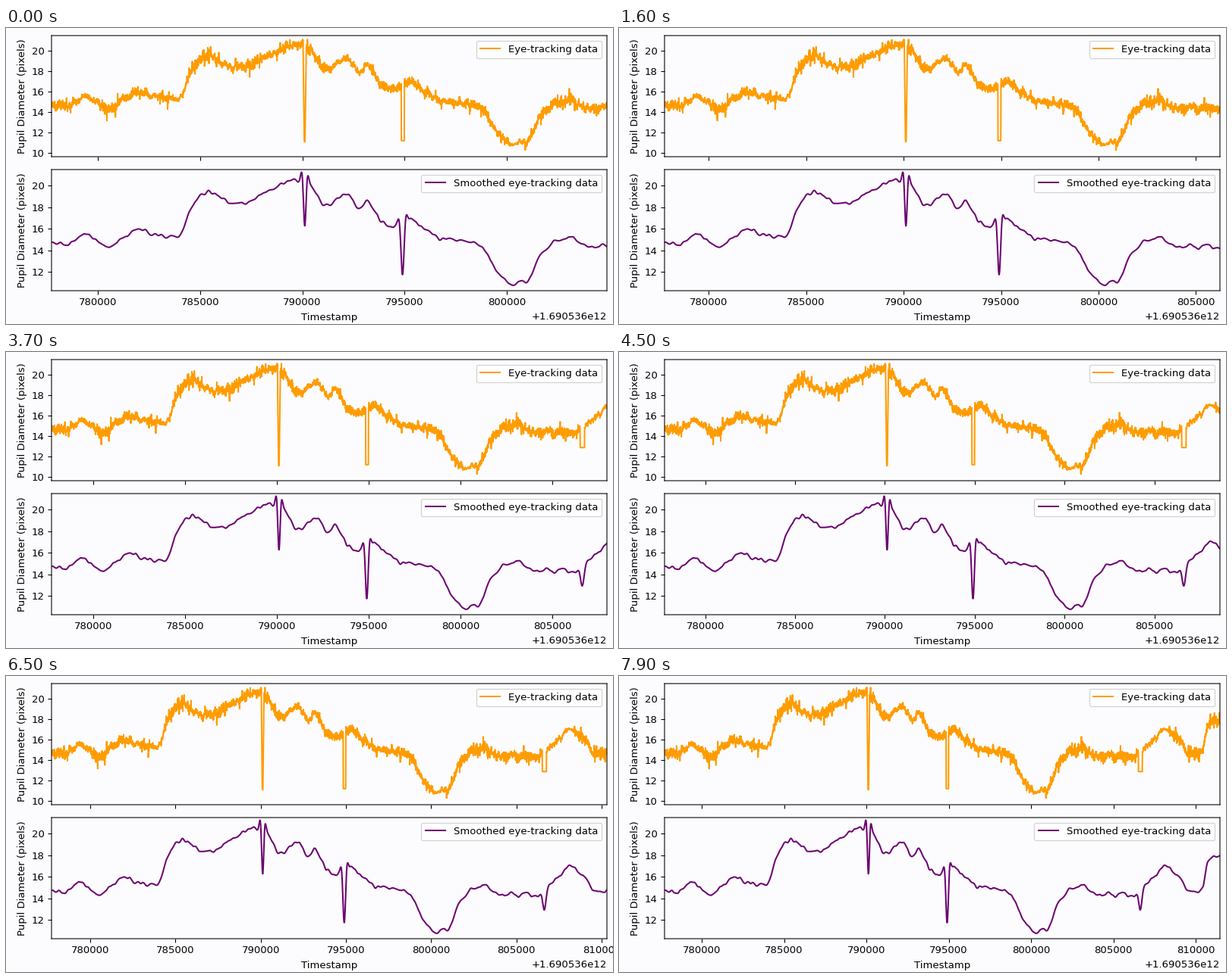
A matplotlib script for the animation above (8 s loop, 800 px wide and 391 px high).

```python
import numpy as np
import matplotlib.pyplot as plt
from matplotlib.animation import FuncAnimation
from matplotlib.lines import Line2D

WIDTH, HEIGHT, DPI = 800, 391, 96
FRAMES, INTERVAL = 80, 100
START = 1690536777737.0
FIRST_SPAN, STEP = 27160, 83.2
SPAN = FIRST_SPAN + STEP * (FRAMES - 1)
PAPER, ORANGE, PURPLE = "#fcfcfe", "#ff9c00", "#6b0070"

# Turning points of the pupil size: seconds, pixels.
TREND = [(0, 14.7), (0.7, 14.5), (1.6, 15.5), (2.7, 14.3), (4.1, 15.8),
         (6.1, 15.2), (7, 18.5), (7.8, 19.4), (8.8, 18.25), (10.5, 19.3),
         (11.8, 20.6), (12.6, 20.2), (13.4, 18.1), (14.5, 19.35), (15, 17.8),
         (15.4, 18.5), (16.4, 16.3), (17, 16.4), (17.5, 17), (18.1, 16.05),
         (19, 15.1), (20.4, 14.9), (21.2, 14.05), (22, 11.4), (22.5, 10.9),
         (23.2, 11.05), (23.9, 13.65), (25.2, 15.1), (26.4, 14.35),
         (28.5, 14.3), (29.5, 15.7), (30.5, 16.9), (32.1, 14.7),
         (32.7, 15.2), (33, 17.6), (33.8, 17.9)]


def monotone_curve(points, x):
    """Cubic curve that never overshoots its points."""
    px, py = np.array(points, float).T
    h = np.diff(px)
    d = np.diff(py) / h
    slope = np.zeros_like(px)
    rising = d[:-1] * d[1:] > 0
    slope[1:-1][rising] = 2 / (1 / d[:-1][rising] + 1 / d[1:][rising])
    i = np.clip(np.searchsorted(px, x, "right") - 1, 0, len(h) - 1)
    u = (x - px[i]) / h[i]
    ease = u * u * (3 - 2 * u)
    bend = u * (1 - u) * ((1 - u) * slope[i] - u * slope[i + 1]) * h[i]
    return py[i] + (py[i + 1] - py[i]) * ease + bend


def soft_noise(rng, size, width):
    """Unit noise smoothed over the given number of samples."""
    k = np.arange(-4 * width, 4 * width + 1)
    kernel = np.exp(-0.5 * (k / width) ** 2)
    noise = np.convolve(rng.normal(size=size), kernel, "same")
    return noise / noise.std()


def dip(t, centre, depth, width, overshoot):
    u2 = ((t - centre) / width) ** 2
    return depth * (1 - overshoot * u2) * np.exp(-u2 / 2)


def make_signals():
    rng = np.random.default_rng(12)
    t = np.arange(0, SPAN + 10, 1000 / 120)
    base = monotone_curve(TREND, t / 1000) + 0.11 * soft_noise(rng, t.size, 10)

    smooth = (base - dip(t, 12382, 4.1, 83, 0.58)
              - dip(t, 17165, 4.9, 98, 0.42) - dip(t, 28890, 1.7, 110, 0.15))

    gain = 0.15 * (1 + 0.3 * soft_noise(rng, t.size, 25))
    raw = base + gain * rng.standard_t(5, t.size).clip(-5, 5)
    raw += 0.1 * soft_noise(rng, t.size, 2)
    blink = (t > 12300) & (t < 12460)
    raw[blink] = np.interp(t[blink], [12300, 12360, 12395, 12460],
                           [20.5, 11.1, 11.1, 20.6])
    raw[(t > 17105) & (t < 17255)] = 11.2
    raw[(t > 28780) & (t < 29025)] = 12.87
    return START + t, raw, smooth


def add_panel(top, bottom, limits, x, y, color, label, **kwargs):
    ax = fig.add_axes([60 / WIDTH, 1 - bottom / HEIGHT,
                       732 / WIDTH, (bottom - top) / HEIGHT],
                      facecolor=PAPER, **kwargs)
    ax.plot(x, y, color=color, lw=1.5, label=label)
    ax.set_ylim(*limits)
    ax.set_yticks(range(int(limits[0]) // 2 * 2 + 2, 21, 2))
    ax.set_ylabel("Pupil Diameter (pixels)")
    ax.legend(loc="upper right")
    for spine in ax.spines.values():
        spine.set_snap(False)
    return ax


plt.rcParams.update({"font.family": "DejaVu Sans", "font.size": 9.92})
fig = plt.figure(figsize=(WIDTH / DPI, HEIGHT / DPI), dpi=DPI, facecolor=PAPER)
stamps, raw, smooth = make_signals()

upper = add_panel(10, 170, (9.63, 21.48), stamps, raw, ORANGE,
                  "Eye-tracking data")
lower = add_panel(187, 347, (10.24, 21.51), stamps, smooth, PURPLE,
                  "Smoothed eye-tracking data", sharex=upper)
upper.tick_params(labelbottom=False)
upper.xaxis.get_offset_text().set_visible(False)
lower.set_xlabel("Timestamp", labelpad=4.7)
lower.xaxis.OFFSETTEXTPAD = 4.3
fig.add_artist(Line2D([0, 1], [0.5 / HEIGHT] * 2, color="#c4c4c4", lw=0.75))


def update(i):
    upper.set_xlim(START, START + FIRST_SPAN + STEP * i)
    return []


animation = FuncAnimation(fig, update, frames=FRAMES, interval=INTERVAL,
                          repeat=True, repeat_delay=0, blit=False)
plt.show()
```
